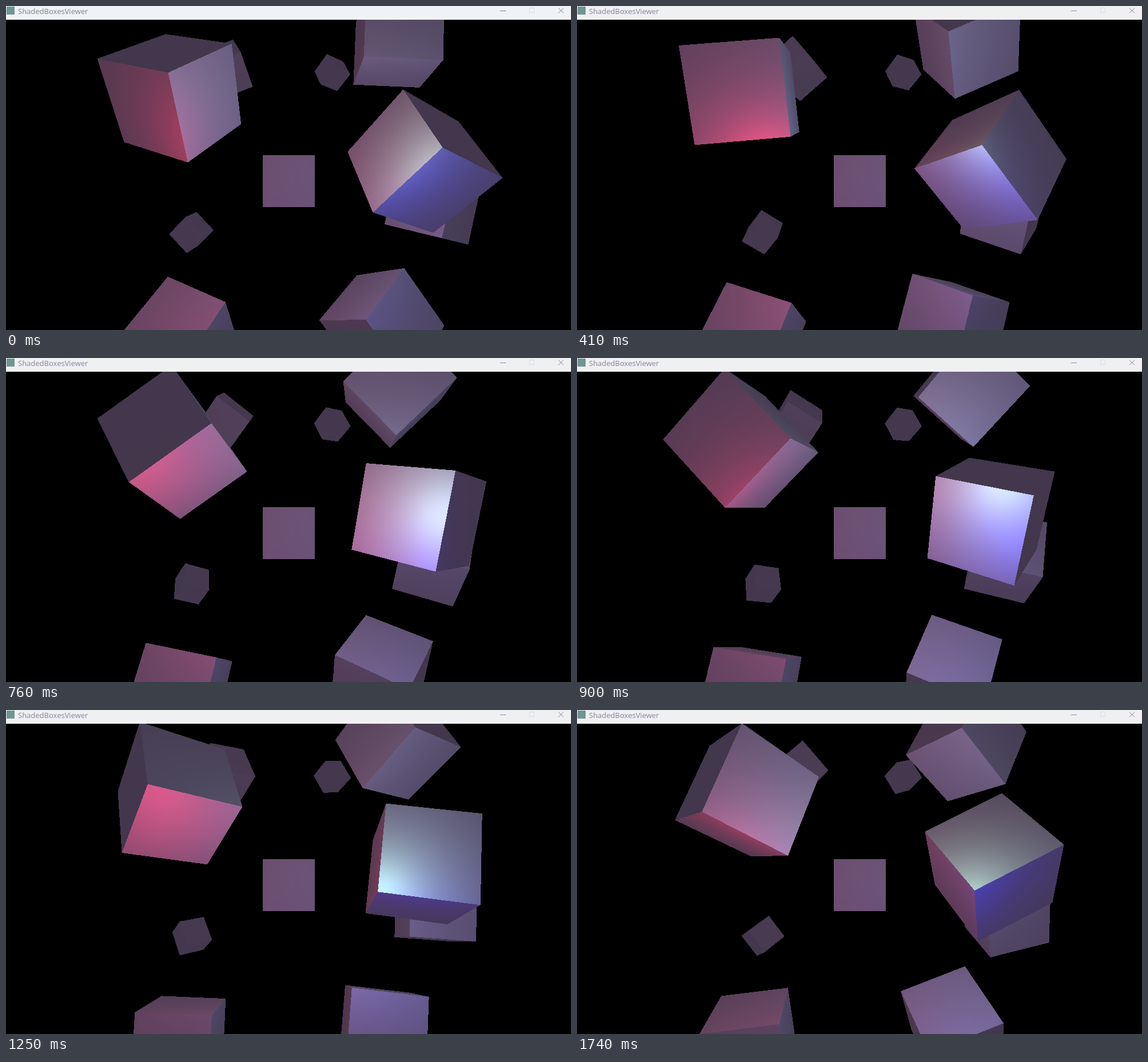
Write an HTML page with a canvas that moves like this. It is 988 px wide and 567 px high and loops after 1.81 s.

```html
<!DOCTYPE html>
<html lang="en">
<head>
<meta charset="utf-8">
<title>Lit cubes</title>
<style>
  html, body { margin: 0; width: 100%; height: 100%; overflow: hidden; background: #000; }
  canvas { display: block; }
</style>
</head>
<body>
<canvas id="stage" width="988" height="567"></canvas>
<script>
const W = 988, H = 567, BAR = 24;
const ctx = document.getElementById('stage').getContext('2d');
const image = ctx.createImageData(W, H - BAR);

// Camera on the z axis, looking towards -z
const FOCAL = 682, CX = 494.4, CY = 306.4, CAMERA_Z = 3;

// Cube number i spins at 20 * i degrees per second around AXIS
const AXIS = [1, 0.3, 0.5].map(v => v / Math.hypot(1, 0.3, 0.5));
const CUBES = [
  [0, 0, -5], [2, 5, -15], [-1.5, -2.2, -2.5], [-3.8, -2, -12.3], [2.4, -0.4, -3.5],
  [-1.7, 3, -7.5], [1.3, -2, -2.5], [1.5, 2, -2.5], [1.5, 0.2, -1.5], [-1.3, 1, -1.5]
].map((pos, i) => ({ pos, speed: 20 * i * Math.PI / 180 }))
 .sort((a, b) => a.pos[2] - b.pos[2]);

const AMBIENT = [66, 55, 76];
const LIGHTS = [
  { pos: [-1.05, -0.03, -0.5], color: [170, 14, 34] },
  { pos: [0.95, 0.2, -0.4], color: [100, 160, 100] },
  { pos: [1.1, -0.4, -0.25], color: [12, 6, 150] }
];
const SPECULAR = 0.6, SHININESS = 16;

const LOOP = 1810, SCENE_START = 7.661;
const STEPS = [0, 70, 130, 200, 270, 340, 410, 490, 560, 610, 690];
for (let t = 760; t < LOOP; t += 70) STEPS.push(t);
const PACE = [[0, 0], [4, 0.268], [8, 0.541], [11, 0.748], [15, 1.019], [18, 1.221], [25, 1.682]];

const dot = (a, b) => a[0] * b[0] + a[1] * b[1] + a[2] * b[2];

function sceneTime(step) {
  const k = Math.max(1, PACE.findIndex(p => p[0] >= step));
  const [s0, t0] = PACE[k - 1], [s1, t1] = PACE[k];
  return SCENE_START + t0 + (t1 - t0) * (step - s0) / (s1 - s0);
}

// The three rotated unit axes of a cube
function rotatedAxes(angle) {
  const c = Math.cos(angle), s = Math.sin(angle), [x, y, z] = AXIS, k = 1 - c;
  return [
    [c + k * x * x, k * x * y + s * z, k * x * z - s * y],
    [k * x * y - s * z, c + k * y * y, k * y * z + s * x],
    [k * x * z + s * y, k * y * z - s * x, c + k * z * z]
  ];
}

function visibleFaces(pos, axes) {
  const toCamera = [-pos[0], -pos[1], CAMERA_Z - pos[2]];
  const faces = [];
  axes.forEach((axis, i) => {
    for (const sign of [-1, 1]) {
      const normal = axis.map(v => v * sign);
      const height = dot(normal, toCamera) - 0.5;
      if (height > 0) faces.push({ normal, height, u: axes[(i + 1) % 3], v: axes[(i + 2) % 3] });
    }
  });
  return faces;
}

function screenBox(pos, axes) {
  const xs = [], ys = [];
  for (let corner = 0; corner < 8; corner++) {
    const p = pos.map((v, k) =>
      axes.reduce((sum, axis, i) => sum + axis[k] * (corner >> i & 1 ? 0.5 : -0.5), v));
    const scale = FOCAL / (CAMERA_Z - p[2]);
    xs.push(CX + p[0] * scale);
    ys.push(CY - p[1] * scale);
  }
  return {
    left: Math.max(0, Math.floor(Math.min(...xs))), right: Math.min(W, Math.ceil(Math.max(...xs))),
    top: Math.max(BAR, Math.floor(Math.min(...ys))), bottom: Math.min(H, Math.ceil(Math.max(...ys)))
  };
}

function shade(x, y, z, n, offset) {
  let r = AMBIENT[0], g = AMBIENT[1], b = AMBIENT[2];
  const vz = CAMERA_Z - z, viewLength = Math.hypot(x, y, vz);
  for (const { pos, color } of LIGHTS) {
    const lx = pos[0] - x, ly = pos[1] - y, lz = pos[2] - z;
    const facing = n[0] * lx + n[1] * ly + n[2] * lz;
    if (facing <= 0) continue;
    const d = Math.sqrt(lx * lx + ly * ly + lz * lz);
    const hx = lx / d - x / viewLength, hy = ly / d - y / viewLength, hz = lz / d + vz / viewLength;
    const half = (n[0] * hx + n[1] * hy + n[2] * hz) / Math.sqrt(hx * hx + hy * hy + hz * hz);
    const power = (facing / d + SPECULAR * Math.pow(Math.max(0, half), SHININESS))
      / (1 + 0.35 * d + 0.44 * d * d);
    r += color[0] * power;
    g += color[1] * power;
    b += color[2] * power;
  }
  image.data[offset] = r;
  image.data[offset + 1] = g;
  image.data[offset + 2] = b;
}

function drawCube({ pos, speed }, time) {
  const axes = rotatedAxes(speed * time);
  const faces = visibleFaces(pos, axes);
  const box = screenBox(pos, axes);
  for (let py = box.top; py < box.bottom; py++) {
    const ry = (CY - py - 0.5) / FOCAL;
    for (let px = box.left; px < box.right; px++) {
      const rx = (px + 0.5 - CX) / FOCAL;
      for (const { normal: n, height, u, v } of faces) {
        const depth = height / (n[2] - n[0] * rx - n[1] * ry);
        if (!(depth > 0)) continue;
        const x = rx * depth, y = ry * depth, z = CAMERA_Z - depth;
        const dx = x - pos[0], dy = y - pos[1], dz = z - pos[2];
        if (Math.abs(u[0] * dx + u[1] * dy + u[2] * dz) > 0.5) continue;
        if (Math.abs(v[0] * dx + v[1] * dy + v[2] * dz) > 0.5) continue;
        shade(x, y, z, n, ((py - BAR) * W + px) * 4);
        break;
      }
    }
  }
}

function drawTitleBar(fresh) {
  ctx.fillStyle = fresh ? '#eff3f8' : '#f0f0f2';
  ctx.fillRect(0, 0, W, BAR);
  ctx.fillStyle = '#6f9590';
  ctx.fillRect(1, 1, 14, 14);
  const ink = fresh ? '#808388' : '#8484a4';
  ctx.fillStyle = ink;
  ctx.font = '13px "Open Sans", "Noto Sans", sans-serif';
  ctx.fillText('ShadedBoxesViewer', 21, 13.5);
  ctx.fillRect(864, 8, 10, 1);
  ctx.lineWidth = 1;
  ctx.strokeStyle = '#d6dee8';
  ctx.strokeRect(915.5, 3.5, 8, 8);
  ctx.strokeStyle = ink;
  ctx.beginPath();
  ctx.moveTo(966, 3.5); ctx.lineTo(975, 12.5);
  ctx.moveTo(975, 3.5); ctx.lineTo(966, 12.5);
  ctx.stroke();
}

function draw(step) {
  new Uint32Array(image.data.buffer).fill(0xff000000);
  const time = sceneTime(step);
  for (const cube of CUBES) drawCube(cube, time);
  ctx.putImageData(image, 0, BAR);
  drawTitleBar(step === 0);
}

let start, shown = -1;
function tick(now) {
  start ??= now;
  const t = (now - start) % LOOP;
  const step = STEPS.findLastIndex(s => s <= t);
  if (step !== shown) draw(shown = step);
  requestAnimationFrame(tick);
}
requestAnimationFrame(tick);
</script>
</body>
</html>
```
